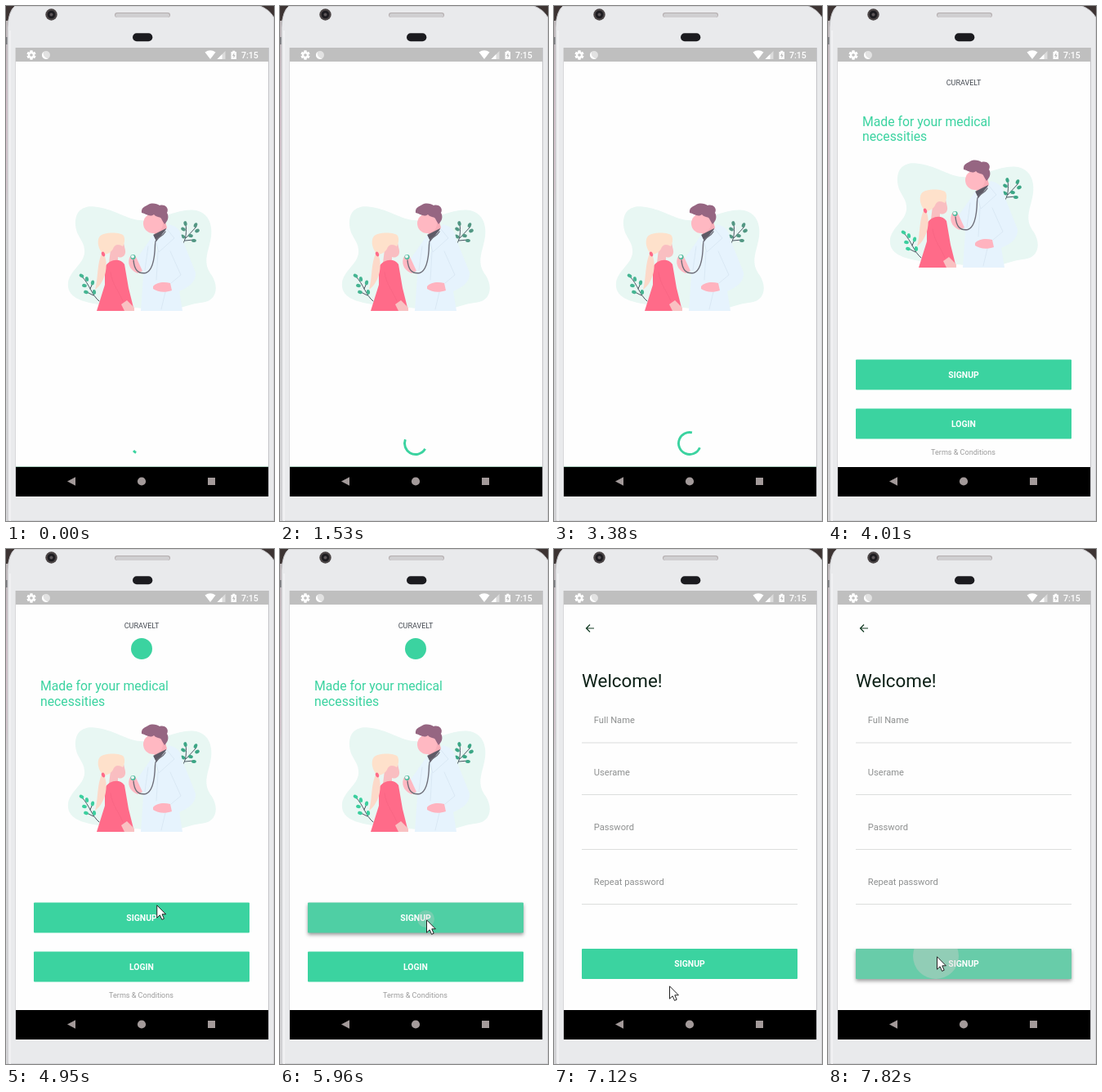
Write an HTML page with a canvas that moves like this. It is 328 px wide and 630 px high and loops after 7990 ms.

```html
<!DOCTYPE html>
<html lang="en">
<head>
<meta charset="utf-8">
<title>Clinic app</title>
<style>
html, body { margin: 0; width: 100%; height: 100%; overflow: hidden; background: #e9eaec; }
canvas { display: block; width: 328px; height: 630px; }
</style>
</head>
<body>
<canvas id="stage"></canvas>
<script>
const W = 328, H = 630, LOOP = 7990;
const GREEN = '#3bd3a0';
const canvas = document.getElementById('stage');
const dpr = window.devicePixelRatio || 1;
canvas.width = W * dpr;
canvas.height = H * dpr;
const c = canvas.getContext('2d');
c.scale(dpr, dpr);

function shape(d, fill, stroke, width = 1) {
  const p = new Path2D(d);
  if (fill) { c.fillStyle = fill; c.fill(p); }
  if (stroke) { c.strokeStyle = stroke; c.lineWidth = width; c.stroke(p); }
}
function rect(x, y, w, h, fill) {
  c.fillStyle = fill;
  c.fillRect(x, y, w, h);
}
function pill(x, y, w, h, r, fill) {
  c.beginPath();
  c.roundRect(x, y, w, h, r);
  c.fillStyle = fill;
  c.fill();
}
function oval(x, y, rx, ry, fill, turn = 0) {
  c.beginPath();
  c.ellipse(x, y, rx, ry, turn, 0, 7);
  c.fillStyle = fill;
  c.fill();
}
const dot = (x, y, r, fill) => oval(x, y, r, r, fill);
function text(s, x, y, size, fill, weight = 400, align = 'left') {
  c.font = `${weight} ${size}px Roboto, sans-serif`;
  c.textAlign = align;
  c.fillStyle = fill;
  c.fillText(s, x, y);
}

// Phone body and system bars

function phone() {
  rect(0, 0, W, H, '#3d3433');
  const edge = c.createLinearGradient(0, 0, 0, H);
  edge.addColorStop(0, '#b9b4b5');
  edge.addColorStop(.2, '#d3bfc9');
  edge.addColorStop(.35, '#d5c6cd');
  edge.addColorStop(.4, '#d4d4d6');
  edge.addColorStop(1, '#d8d8da');
  rect(0, 18, 3, H, edge);
  rect(0, 38, 2, 9, '#77777b');
  shape('M2 630V26Q3 6 11 0H311Q322 4 328 14V630Z', '#e9eaec', '#c3c3c6');
  rect(4, 30, 2, H, '#f1f1f3');
  rect(11, 51, 1, 549, '#d8d8da');
  rect(321, 51, 1, 549, '#c4c4c8');

  dot(55.5, 10.5, 7.2, '#4a4445');
  dot(55.5, 10.5, 4.8, '#1d1c20');
  dot(55.5, 10.5, 2, '#5c5558');
  pill(133, 8, 68, 6, 3, '#b4aeaf');
  pill(134, 9, 66, 5, 2.5, '#d0cfd1');
  pill(155, 33.3, 24.3, 9.9, 4.9, '#1b1b1f');

  rect(12, 51, 309, 17, '#bfbfbf');
  rect(12, 68, 309, 496, '#fefefe');
  rect(12, 564, 309, 36, '#000');
  statusIcons();

  const gray = '#a39a9a';
  shape('M75 581.5L85 576.3V586.7Z', gray);
  dot(166, 581.5, 5.1, gray);
  rect(247, 577, 9, 9, gray);
}

function statusIcons() {
  c.save();
  c.translate(31, 60);
  for (let i = 0; i < 6; i++) {
    rect(-1.5, -5.5, 3, 11, '#fff');
    c.rotate(Math.PI / 3);
  }
  dot(0, 0, 4, '#fff');
  dot(0, 0, 1.8, '#bfbfbf');
  c.restore();
  dot(49, 60, 5, '#e2e2e2');
  shape('M46 56A5 5 0 0 0 52 64A6 6 0 0 1 46 56Z', '#fff');
  shape('M243.5 56.5Q250 52 256.5 56.5L250 65Z', '#fff');
  shape('M268.5 55V65H258.5Z', '#dcdcdc');
  shape('M264.5 59V65H258.5Z', '#fff');
  shape('M275.5 56H277.3V54.7H280.3V56H282V65H275.5Z', '#fff');
  shape('M279.3 57L277 61H278.5V64L280.7 60H279.3Z', '#bfbfbf');
  text('7:15', 288, 63.7, 10.6, '#fff', 500);
}

// Doctor and patient

function plant(stem, leaves, color) {
  shape(stem, null, '#4a5560', 1);
  for (const [x, y, turn] of leaves) oval(x, y, 2.9, 2.1, color, turn);
}

function illustration(dy, leftLeaf, rightLeaf) {
  c.save();
  c.translate(0, dy);
  c.lineCap = 'round';
  shape('M85 268C84 250 95 243 112 246C138 250 150 264 172 262C195 260 215 245 236 251C252 257 254 275 249 292C246 304 242 315 250 327C262 343 258 362 238 363C222 365 212 372 190 372L114 365C92 362 74 356 76 338C79 322 98 314 96 298C95 286 86 282 85 268Z', '#e8f7f3');
  plant('M114 361C105 354 102 340 93 331M103 346L106 339M107 354L99 350', [
    [92.5, 330, .5], [99, 334, 1.4], [96, 342, .2], [106, 338.5, 1.7],
    [98, 350, .3], [108, 350, 1.5]], leftLeaf);
  plant('M215 293C221 286 221 275 220 267M220 284L233 270M219 287L230 286', [
    [219.5, 266, 1.4], [217, 273, .5], [232, 268, 2], [234, 275, 2.7],
    [226, 281, .2], [216.5, 282, .5], [230, 287, .1]], rightLeaf);

  // Doctor
  shape('M181 272L194 260L198 275L190 288L182 283Z', '#f8adb8');
  oval(180, 266, 12, 12, '#ffb8c2');
  shape('M166 253C165 246 171 245 174 243C179 240 185 242 188 244C195 242 200 248 197 253C200 258 198 263 194 267L191 262C189 256 185 260 181 255C176 259 171 254 166 253Z', '#966682');
  shape('M180 280L196 272L195 280L184 289Z', '#5e5a66');
  shape('M165 373L168 330L160 309L174 289L180 280L184 288L196 273L199 267C209 269 214 274 216 286L232 326C233 337 224 344 212 349L216 373Z', '#e6f3fd');
  shape('M197 273L206 284L187 301L183 287M174 294L170 323M201 300L214 329L202 339M195 350L190 371M186 301L184 335', null, '#d6e5f2', .8);
  shape('M180 343C184 338 193 337 201 339L203 348C194 351 186 350 180 346Z', '#ffb3bf');
  shape('M151 308C153 304 158 304 160 309L167 324L161 327C154 324 148 318 151 308Z', '#ffb8c2');
  shape('M195 276C191 284 182 282 182.5 292C182 310 179 324 171 326.5C161 328 157 322 156 311', null, '#6e6e78', 1.4);
  dot(155.5, 307, 3.1, '#4bb99b');
  dot(155, 306.5, 2, '#e9f8f5');

  // Patient
  shape('M129 290H144L146 299C147 306 141 309 137 307L137 314L126 314Z', '#f9bec1');
  shape('M114 283C117 276 141 276 144 281C146 286 145 290 143 294C138 291 133 291 131 297C127 304 119 306 116 300C112 293 112 287 114 283Z', '#fee1cb');
  shape('M121 319C127 309 140 308 145 316L150 345L157 373H111L121 341Z', '#ff6b89');
  shape('M118 301C123 307 124 318 121 329C118 338 114 343 109 347C113 334 111 314 118 301Z', '#fcd9c9');
  oval(119, 303.5, 2, 3, '#ff6b89', -.4);
  shape('M141 365L148 360L157 369V373H145Z', '#f9c1c2');
  shape('M128 326C130 341 139 350 143 361', null, '#f76482', .7);
  c.restore();
}

// Shared controls

function button(y, label, fill = GREEN, raised = false) {
  c.save();
  if (raised) {
    c.shadowColor = 'rgba(0,0,0,.38)';
    c.shadowBlur = 4 * dpr;
    c.shadowOffsetY = 2.5 * dpr;
  }
  pill(34, y, 264, 37, 1, fill);
  c.restore();
  text(label, 166, y + 22.4, 10.4, '#fff', 700, 'center');
}

function ripple(x, y, r, top, alpha) {
  c.save();
  c.beginPath();
  c.rect(34, top, 264, 37);
  c.clip();
  dot(x, y, r, `rgba(215,205,205,${alpha})`);
  c.restore();
}

// Index of the current step within a stepped move
const stepAt = (t, start) => Math.floor((t - start + 8) / 76.85);

// Cubic timing curve with end points (x0, 0) and (x3, 1), solved by bisection
function curve(x, x0, x1, x2, x3) {
  if (x <= x0) return 0;
  if (x >= x3) return 1;
  let lo = 0, hi = 1;
  for (let i = 0; i < 24; i++) {
    const s = (lo + hi) / 2, q = 1 - s;
    const v = x0 * q ** 3 + 3 * x1 * s * q * q + 3 * x2 * s * s * q + x3 * s ** 3;
    if (v < x) lo = s; else hi = s;
  }
  return lo * lo * (3 - 2 * lo);
}

function spinner(time) {
  const t = Math.min(44, stepAt(time, 0)) * 76.85;
  const p = ((t + 100) / 1360) % 1;
  const tail = 270 * curve(p, .5, .7, .6, 1);
  const head = 270 * curve(p, 0, .2, .1, .5);
  const base = 204 + .168 * t + 90 * p - 90;
  const rad = Math.PI / 180;
  c.beginPath();
  c.arc(166, 535, 13.5, (base + tail) * rad, (base + Math.max(head, tail + 4)) * rad);
  c.strokeStyle = GREEN;
  c.lineWidth = 2.9;
  c.lineCap = 'butt';
  c.stroke();
}

// Screens

function splash(t) {
  illustration(0, '#45b592', '#529783');
  rect(12, 563, 309, 1, '#a9cdbd');
  spinner(t);
}

function landing(t) {
  const imageReady = t >= 4010, logoReady = t >= 4080;
  const titleY = logoReady ? 173.3 : imageReady ? 146.8 : 267;
  text('CURAVELT', 166, 96.5, 9, '#434850', 400, 'center');
  if (logoReady) dot(166, 122, 13, GREEN);
  text('Made for your medical', 42, titleY, 15.75, GREEN);
  text('necessities', 42, titleY + 18.6, 15.75, GREEN);
  if (imageReady) illustration(logoReady ? -27 : -53, '#3bcf9e', '#3ba685');

  const pressed = t >= 5560;
  button(432.5, 'SIGNUP', pressed ? '#4fcfa4' : GREEN, pressed);
  if (t >= 5330) ripple(178.5, 452.5, pressed ? 10.5 : 15, 432.5, pressed ? .28 : .16);
  button(492.5, 'LOGIN');
  text('Terms & Conditions', 165.5, 549.3, 9.05, '#9b9b9b', 400, 'center');
}

function signup(t) {
  shape('M49 97H39.7M44 92.5L39.5 97L44 101.5', null, '#123a22', 1.2);
  text('Welcome!', 34, 169, 22.4, '#0c2016');
  const fields = [['Full Name', 237], ['Userame', 300.5], ['Password', 367.5], ['Repeat password', 434.5]];
  for (const [label, y] of fields) {
    text(label, 48.8, y - 23.7, 11.15, '#8e9090');
    rect(34, y - .5, 264, 1, '#dcdedd');
  }
  const k = Math.min(3, stepAt(t, 7590));
  const pressed = k >= 0;
  const tints = ['#49d0a3', '#54cea5', '#5ecda7', '#68cca9'];
  button(489, 'SIGNUP', pressed ? tints[k] : GREEN, pressed);
  if (pressed) ripple(132, 498, 7 + 7 * k, 489, .36);
}

// Pointer moves: start and end time, lead-in steps, intervals, from, to
const moves = [
  [4480, 4950, 0, 4, [214, 569], [186, 429]],
  [4950, 6340, 1, 4, [186, 429], [179, 453]],
  [6340, 6800, 1, 6, [179, 453], [108, 224]],
  [7120, LOOP, 0, 4, [141, 534], [133, 498]]
];

function pointer(t) {
  const move = moves.find(([start, end]) => t >= start && t < end);
  if (!move) return;
  const [start, , lead, count, a, b] = move;
  const f = Math.min(1, (stepAt(t, start) + lead) / count);
  c.save();
  c.translate(a[0] + (b[0] - a[0]) * f, a[1] + (b[1] - a[1]) * f);
  c.lineJoin = 'miter';
  shape('M.5 .8V16.2L4.1 12.8L6.6 18.4L9.2 17.2L6.8 11.8H11.4Z', '#fff', '#222');
  c.restore();
}

function draw(t) {
  phone();
  if (t < 3930) splash(t);
  else if (t < 6110) landing(t);
  else signup(t);
  pointer(t);
}

const began = performance.now();
function tick() {
  draw((performance.now() - began) % LOOP);
  requestAnimationFrame(tick);
}
tick();
</script>
</body>
</html>
```
